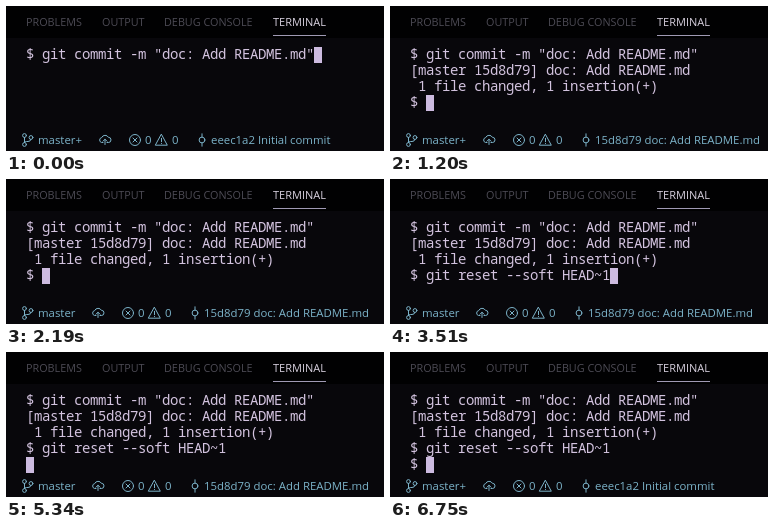
Write an HTML page that moves like this. It is 378x145 px and loops after 8130 ms.

```html
<!DOCTYPE html>
<html lang="en">
<head>
<meta charset="utf-8">
<title>Terminal</title>
<style>
  html, body { margin: 0; width: 100%; height: 100%; overflow: hidden; background: #08070b; }
  svg { display: block; }
  text { white-space: pre; }
  .tabs { font: 10.8px "Open Sans", "Noto Sans", sans-serif; fill: #4d4b55; }
  .tabs .active { font-size: 11px; fill: #d6cfdd; }
  .term { font: 14px "Noto Sans Mono", monospace; letter-spacing: -0.4px; fill: #d3c3df; }
  .status { font: 11.4px "Open Sans", "Noto Sans", sans-serif; fill: #7cb3c9; }
  .icon { fill: none; stroke: #7cb3c9; stroke-width: 1; stroke-linecap: round; stroke-linejoin: round; }
</style>
</head>
<body>
<svg width="378" height="145" viewBox="0 0 378 145">
  <rect width="378" height="145" fill="#08070b"/>
  <rect width="378" height="32" fill="#010102"/>

  <g class="tabs">
    <text x="20" y="20">PROBLEMS</text>
    <text x="96" y="20">OUTPUT</text>
    <text x="158" y="20">DEBUG CONSOLE</text>
    <text x="267" y="20" class="active">TERMINAL</text>
    <rect x="267" y="29" width="53" height="1" fill="#a09ab4"/>
  </g>

  <g class="term">
    <g id="lines"></g>
    <rect id="cursor" width="8" height="16" fill="#cdbbe0"/>
  </g>

  <g class="status">
    <g class="icon">
      <circle cx="18.5" cy="129.5" r="1.9"/>
      <circle cx="18.5" cy="138.5" r="1.9"/>
      <circle cx="25" cy="131.5" r="1.9"/>
      <path d="M18.5 131.4V136.6M25 133.4Q24.6 135.5 22 135.5H20.5Q18.8 135.5 18.5 136.6"/>
    </g>
    <text id="branch" x="32" y="138"></text>
    <g id="right">
      <g class="icon">
        <path d="M97 136.5H95.6A2.5 2.5 0 0 1 95.7 131.6A3.7 3.7 0 0 1 102.4 131.3A2.6 2.6 0 0 1 102.4 136.5H101"/>
        <path d="M99 138.5V133.3M97 135.2L99 133.2L101 135.2"/>
        <circle cx="129" cy="134" r="5.5"/>
        <path d="M127 132L131 136M131 132L127 136"/>
        <path d="M155.5 128.5L161.3 139.2H149.7ZM155.5 132.3V135.6M155.5 137.3V137.5"/>
        <circle cx="196" cy="134" r="2.9"/>
        <path d="M196 127.8V131M196 137V140.2"/>
      </g>
      <text x="139" y="138">0</text>
      <text x="166" y="138">0</text>
      <text id="commit" x="205" y="138"></text>
    </g>
  </g>
</svg>

<script>
const DURATION = 8130;
const CELL = { x: 20, y: 41, width: 8, height: 16 };

const commitCommand = '$ git commit -m "doc: Add README.md"';
const committed = [commitCommand, "[master 15d8d79] doc: Add README.md", " 1 file changed, 1 insertion(+)"];
const reset = [...committed, "$ git reset --soft HEAD~1"];
const first = "eeec1a2 Initial commit";
const second = "15d8d79 doc: Add README.md";

// The cursor always follows the last line.
const steps = [
  { at: 0,    lines: [commitCommand],               dirty: true,  commit: first },
  { at: 1050, lines: [commitCommand, ""],           dirty: true,  commit: first },
  { at: 1200, lines: [...committed, "$ "],          dirty: true,  commit: second },
  { at: 2190, lines: [...committed, "$ "],          dirty: false, commit: second },
  { at: 2610, lines: [...committed, commitCommand], dirty: false, commit: second },
  { at: 3510, lines: reset,                         dirty: false, commit: second },
  { at: 5340, lines: [...reset, ""],                dirty: false, commit: second },
  { at: 5370, lines: [...reset, "$ "],              dirty: false, commit: first },
  { at: 6750, lines: [...reset, "$ "],              dirty: true,  commit: first },
];

const byId = id => document.getElementById(id);
const rows = Array.from({ length: 5 }, (_, row) => {
  const text = document.createElementNS("http://www.w3.org/2000/svg", "text");
  text.setAttribute("x", CELL.x);
  text.setAttribute("y", CELL.y + row * CELL.height + 12);
  return byId("lines").appendChild(text);
});

function show({ lines, dirty, commit }) {
  rows.forEach((row, i) => { row.textContent = lines[i] || ""; });
  const last = lines.length - 1;
  byId("cursor").setAttribute("x", CELL.x + lines[last].length * CELL.width);
  byId("cursor").setAttribute("y", CELL.y + last * CELL.height);
  byId("branch").textContent = dirty ? "master+" : "master";
  byId("right").setAttribute("transform", `translate(${dirty ? 0 : -7} 0)`);
  byId("commit").textContent = commit;
}

const start = performance.now();
let current;

function tick() {
  const time = (performance.now() - start) % DURATION;
  const step = steps.findLast(({ at }) => at <= time);
  if (step !== current) show(current = step);
  requestAnimationFrame(tick);
}
tick();
</script>
</body>
</html>
```
